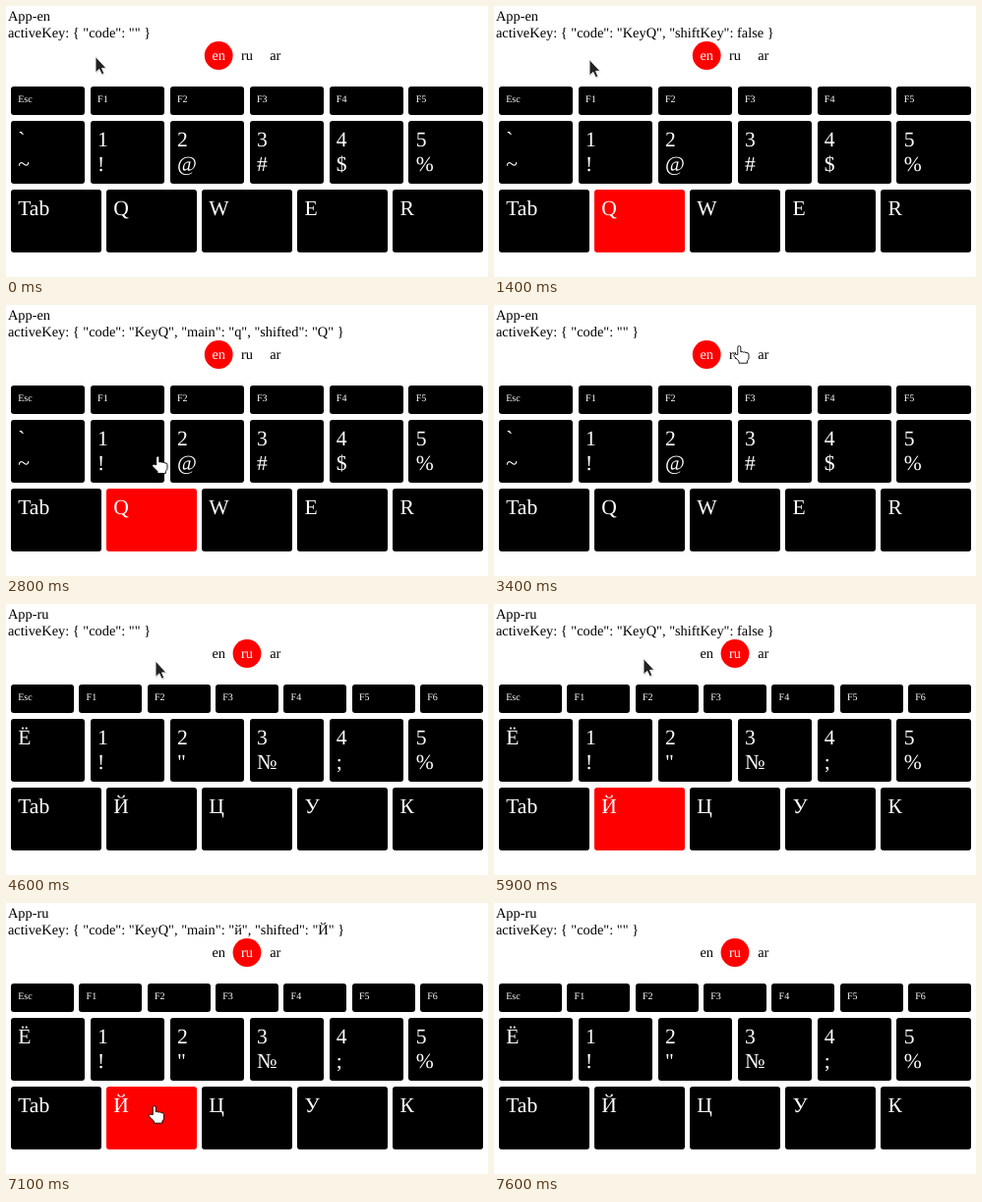
Write an HTML page that moves like this. It is 490 px wide and 276 px high and loops after 8.2 s.

```html
<!DOCTYPE html>
<html lang="en">
<head>
<meta charset="utf-8">
<title>Keyboard</title>
<style>
  html, body { margin: 0; width: 100%; height: 100%; overflow: hidden; background: #fff; }
  svg { display: block; width: 490px; height: 276px; }
  text { font-family: "Liberation Serif", "Times New Roman", serif; font-size: 14.4px; text-rendering: geometricPrecision; white-space: pre; }
</style>
</head>
<body>
<svg viewBox="0 0 490 276" xmlns="http://www.w3.org/2000/svg">
  <text id="title" x="1.9" y="15"></text>
  <text id="status" x="1.9" y="31.6"></text>
  <g id="langs"></g>
  <g id="en"></g>
  <g id="ru"></g>
  <g id="arrow">
    <path d="M.6 1V17.3L4.4 13.8L6.9 19.2L9.4 18L7 12.8H11.9Z" opacity=".2"/>
    <path d="M0 0V16.3L3.8 12.9L6.3 18.3L8.8 17.1L6.5 11.9H11Z" fill="#222" stroke="#fff" stroke-width=".9" stroke-linejoin="round"/>
  </g>
  <path id="hand" fill="#fff" stroke="#000" stroke-width=".9" stroke-linejoin="round"
    d="M4.8 9.6V2.2a1.5 1.5 0 0 1 3 0V6.8q1.4 -.9 2.6 .3q1.5 -.7 2.6 .5q3 -.5 3 1.9V13q0 1.6 -1.6 3V18.2H6V16.2L1.2 11.4q-1 -1.4 .2 -2.1q1.2 -.6 2.2 .2Z"/>
</svg>
<script>
const LOOP = 8200, STEP = 100, SWITCH = 3800, LEAVE = 7600;
const EM = 14.4, GAP = 5.4, LEFT = 5, WIDTH = 480;
const NS = "http://www.w3.org/2000/svg";
const byId = id => document.getElementById(id);

function add(parent, tag, attrs, text) {
  const el = document.createElementNS(NS, tag);
  for (const k in attrs) el.setAttribute(k, attrs[k]);
  if (text) el.textContent = text;
  parent.appendChild(el);
  return el;
}

// One row of equal keys, edges on whole pixels; each label is a list of lines.
function addRow(parent, y, height, em, labels) {
  const pitch = (WIDTH + GAP) / labels.length, size = EM * em;
  return labels.map((lines, i) => {
    const left = LEFT + i * pitch, x = Math.round(left);
    const width = Math.round(left + pitch - GAP) - x;
    const rect = add(parent, "rect", { x, y, width, height, rx: 3 });
    lines.forEach((line, n) => add(parent, "text", {
      x: left + EM / 2, y: y + EM / 2 + size * (0.891 + n * 1.15),
      style: `font-size:${size}px`, fill: "#fff"
    }, line));
    return rect;
  });
}

// Draws a layout and returns its KeyQ rectangle.
function addBoard(id, fnCount, digits, letters) {
  const g = byId(id);
  const fn = Array.from({ length: fnCount + 1 }, (_, i) => [i ? "F" + i : "Esc"]);
  addRow(g, 82, 29, 0.7, fn);
  addRow(g, 117, 64, 1.5, digits.split(" ").map(s => [...s]));
  return addRow(g, 187, 64, 1.5, [["Tab"], ...[...letters].map(c => [c])])[1];
}

const keyQ = {
  en: addBoard("en", 5, "`~ 1! 2@ 3# 4$ 5%", "QWER"),
  ru: addBoard("ru", 6, "Ё 1! 2\" 3№ 4; 5%", "ЙЦУК")
};

const langs = ["en", "ru", "ar"].map((name, i) => {
  const x = LEFT + WIDTH / 2 + (i - 1) * 2 * EM;
  return {
    name,
    dot: add(byId("langs"), "circle", { cx: x, cy: 50.5, r: EM, fill: "#f00" }),
    label: add(byId("langs"), "text", { x, y: 55, "text-anchor": "middle" }, name)
  };
});

const typed = (from, to) => ({ from, to, text: '"code": "KeyQ", "shiftKey": false' });
const clicked = (from, to, c) => ({
  from, to, text: `"code": "KeyQ", "main": "${c}", "shifted": "${c.toUpperCase()}"`
});
const presses = [typed(600, 1500), clicked(2200, 3100, "q"), typed(4900, 6000), clicked(6600, 7400, "й")];

// Pointer moves; it rests between them.
const move = (from, to, x, y) => ({ from, to, x, y });
const moves = [
  move(0, 0, 91, 51.5),
  move(1000, 1200, 97, 54.5),
  move(1400, 1900, 146, 206),   // to the key
  move(2700, 3400, 243, 41),    // to the language switch
  move(4100, 4400, 150, 80),
  move(4400, 4600, 152, 58),
  move(4800, 4900, 152, 55.5),
  move(5900, 6200, 143, 132),   // to the key again
  move(6300, 6400, 144.5, 206),
  move(7100, 7200, 153, 153),
  move(7300, 7500, 91, 16)
];

// Sideways motion starts slowly, vertical motion ends slowly.
function pointerAt(t) {
  let [{ x, y }] = moves;
  for (const m of moves.slice(1)) {
    const k = Math.min(1, Math.max(0, (t - m.from) / (m.to - m.from)));
    x += (m.x - x) * k ** 2;
    y += (m.y - y) * (1 - (1 - k) ** 2.5);
  }
  return [x, y];
}

const show = (el, on) => el.setAttribute("visibility", on ? "visible" : "hidden");

function render(time) {
  const t = Math.floor((time % LOOP) / STEP) * STEP;
  const lang = t < SWITCH ? "en" : "ru";
  const press = presses.find(p => t >= p.from && t < p.to);

  byId("title").textContent = "App-" + lang;
  byId("status").textContent = `activeKey: { ${press ? press.text : '"code": ""'} }`;
  for (const l of langs) {
    show(l.dot, l.name === lang);
    l.label.setAttribute("fill", l.name === lang ? "#fff" : "#000");
  }
  for (const name in keyQ) {
    show(byId(name), name === lang);
    keyQ[name].setAttribute("fill", press ? "#f00" : "#000");
  }

  const [x, y] = pointerAt(t);
  const overLang = x > 198 && y > 34 && y < 65;
  const hand = y > 81.5 || overLang;
  show(byId("hand"), t < LEAVE && hand);
  show(byId("arrow"), t < LEAVE && !hand);
  for (const id of ["hand", "arrow"]) byId(id).setAttribute("transform", `translate(${x} ${y})`);
}

let start;
function tick(now) {
  start ??= now;
  render(now - start);
  requestAnimationFrame(tick);
}
render(0);
requestAnimationFrame(tick);
</script>
</body>
</html>
```
